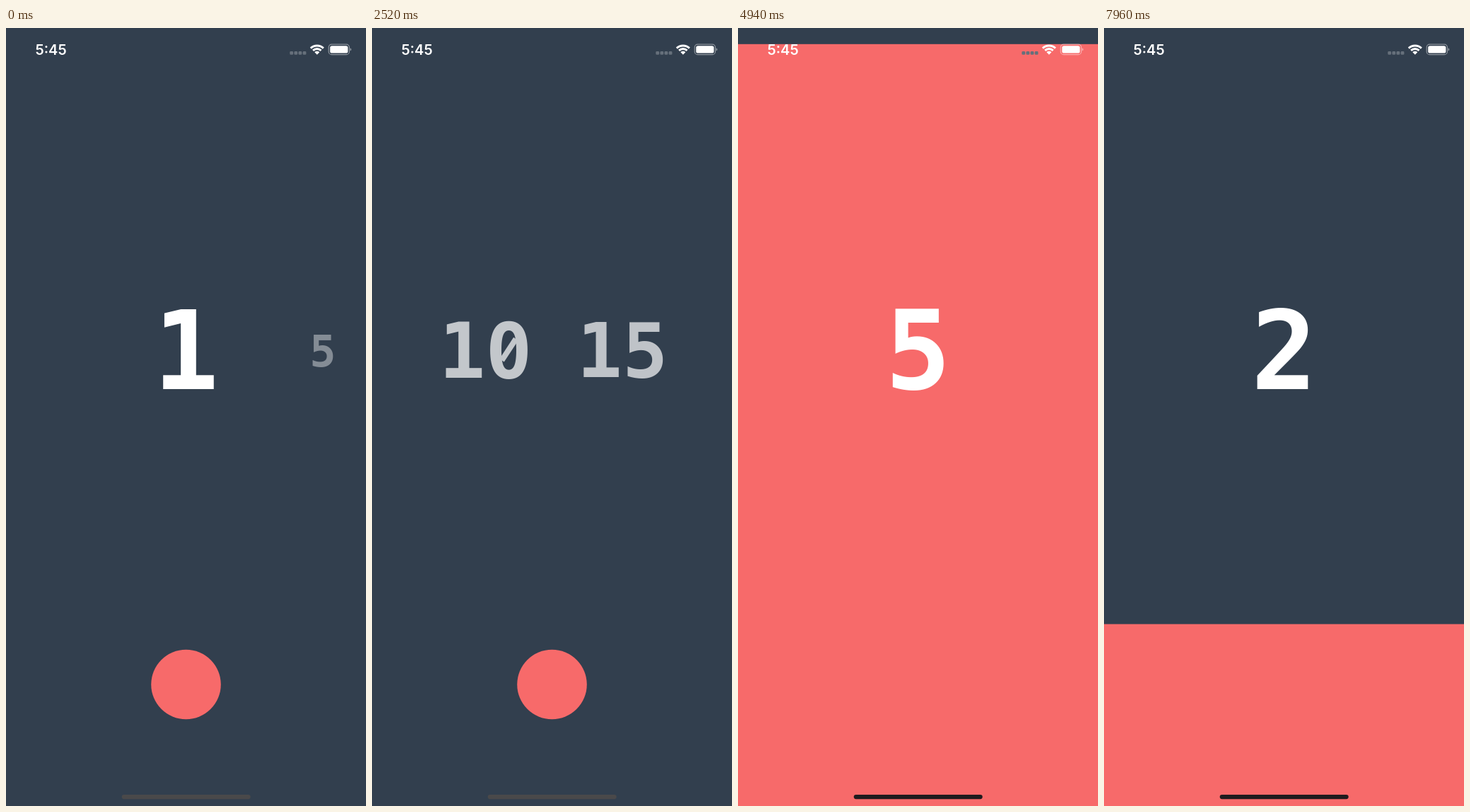
These frames come from a looping animation (509 px wide and 1101 px high, 8000 ms). An HTML page:

```html
<!DOCTYPE html>
<html lang="en">
<head>
<meta charset="utf-8">
<title>Countdown timer</title>
<style>
  html, body { margin: 0; width: 100%; height: 100%; overflow: hidden; background: #323f4e; }
  svg { display: block; width: 100%; height: 100%; }
  .num { font: bold 154.7px "DejaVu Sans Mono", monospace; text-anchor: middle; fill: #fff; }
  .clock { font: 600 20px Inter, sans-serif; text-anchor: middle; fill: #fff; }
</style>
</head>
<body>
<svg viewBox="0 0 509 1101" xmlns="http://www.w3.org/2000/svg">
  <rect width="509" height="1101" fill="#323f4e"/>
  <rect id="fill" width="509" height="1101" fill="#f76a6a"/>
  <circle id="button" cx="254.5" cy="929" r="49.3" fill="#f76a6a"/>
  <g id="list"></g>
  <text id="count" class="num" x="254.5" y="511"></text>

  <text class="clock" x="63.6" y="37.7">5:45</text>
  <g fill="#66707b">
    <rect x="401.3" y="33" width="4.8" height="4.8" rx="1.4"/>
    <rect x="407.4" y="33" width="4.8" height="4.8" rx="1.4"/>
    <rect x="413.5" y="33" width="4.8" height="4.8" rx="1.4"/>
    <rect x="419.6" y="33" width="4.8" height="4.8" rx="1.4"/>
  </g>
  <g fill="none" stroke="#fff" stroke-width="2.9">
    <path d="M430.8 28.6A12.9 12.9 0 0 1 448.8 28.6"/>
    <path d="M434.1 31.9A8.1 8.1 0 0 1 445.5 31.9"/>
    <path d="M439.8 37.7L436.3 34.2A5 5 0 0 1 443.3 34.2Z" fill="#fff" stroke="none"/>
  </g>
  <rect x="456.2" y="23.2" width="29.2" height="14.4" rx="4.2" fill="none" stroke="#fff" stroke-opacity=".45" stroke-width="1.2"/>
  <rect x="458.2" y="25.2" width="25.2" height="10.4" rx="2.6" fill="#fff"/>
  <path d="M486.6 28.2Q488.2 28.8 488.2 30.4T486.6 32.6Z" fill="#fff" fill-opacity=".5"/>
  <rect id="home" x="163.7" y="1085" width="182" height="6.2" rx="3.1"/>
</svg>
<script>
const LOOP = 8000, W = 509, H = 1101, MID = W / 2, STEP = W * 0.38;
const PRESS = 3735, RELEASE = 3815, HIDE = 3825, RISE = 4133, RUN = 4540;
const SECONDS = 5;
const $ = id => document.getElementById(id);
const clamp = x => Math.min(1, Math.max(0, x));
const span = (t, start, length) => clamp((t - start) / length);
const mix = (a, b, p) => a + (b - a) * p;

// cubic-bezier(.42, 0, 1, 1), mirrored for the second half
function easeIn(x) {
  let lo = 0, hi = 1;
  for (let i = 0; i < 24; i++) {
    const s = (lo + hi) / 2, r = 1 - s;
    if (1.26 * s * r * r + 3 * s * s * r + s * s * s < x) lo = s; else hi = s;
  }
  return lo * lo * (3 - 2 * lo);
}
const ease = x => x < 0.5 ? easeIn(2 * x) / 2 : 1 - easeIn(2 - 2 * x) / 2;
const quad = x => x < 0.5 ? 2 * x * x : 1 - 2 * (1 - x) * (1 - x);

// Accelerating drag, then an exponential glide
function swipe(t, start, drag, tau) {
  const u = t - start, total = drag / 2 + tau;
  if (u <= 0) return 0;
  if (u < drag) return u * u / (2 * drag * total);
  return 1 - tau * Math.exp((drag - u) / tau) / total;
}
const scroll = t => swipe(t, 730, 150, 90) + 2 * swipe(t, 1260, 200, 100) - 2 * swipe(t, 2369, 203, 120);

// Zeros carry a diagonal slash instead of the font's dot
const zero = x => `<ellipse cx="${x}" cy="-2.5" rx="13.5" ry="30" fill="#323f4e"/>
  <path d="M${x - 14} 19L${x + 14} -24" stroke="#fff" stroke-width="11"/>`;

const items = [1, 5, 10, 15, 20, 25].map(n => {
  const g = document.createElementNS("http://www.w3.org/2000/svg", "g");
  g.innerHTML = `<text class="num" y="54">${n}</text>` + (n % 10 ? "" : zero(46.6));
  $("list").append(g);
  return g;
});

function touchOpacity(t) {
  const down = x => mix(1, 0.2, quad(span(x, PRESS, 150)));
  return t < RELEASE ? down(t) : mix(down(RELEASE), 1, quad(span(t, RELEASE, 250)));
}

function draw(t) {
  const pos = scroll(t);
  items.forEach((g, i) => {
    const d = i - pos, k = 1 - 0.6 * clamp(Math.abs(d));
    g.setAttribute("transform", `translate(${MID + d * STEP} 457) scale(${k})`);
    g.setAttribute("opacity", k);
  });

  const hide = ease(span(t, HIDE, 300));
  $("list").setAttribute("opacity", 1 - hide);
  $("button").setAttribute("opacity", (1 - hide) * touchOpacity(t));
  $("button").setAttribute("transform", `translate(0 ${200 * hide})`);

  const run = ease(span(t, RUN, SECONDS * 1000));
  const top = t < RUN ? 1 - ease(span(t, RISE, 300)) : run;
  $("fill").setAttribute("y", H * top);
  $("count").textContent = Math.ceil(SECONDS * (1 - run));
  $("count").setAttribute("opacity", hide);

  const dark = span(t, 4150, 90);
  $("home").setAttribute("fill", `rgb(${mix(74, 31, dark)},${mix(73, 27, dark)},${mix(74, 30, dark)})`);
}

const begin = performance.now();
function tick() {
  draw((performance.now() - begin) % LOOP);
  requestAnimationFrame(tick);
}
tick();
</script>
</body>
</html>
```
